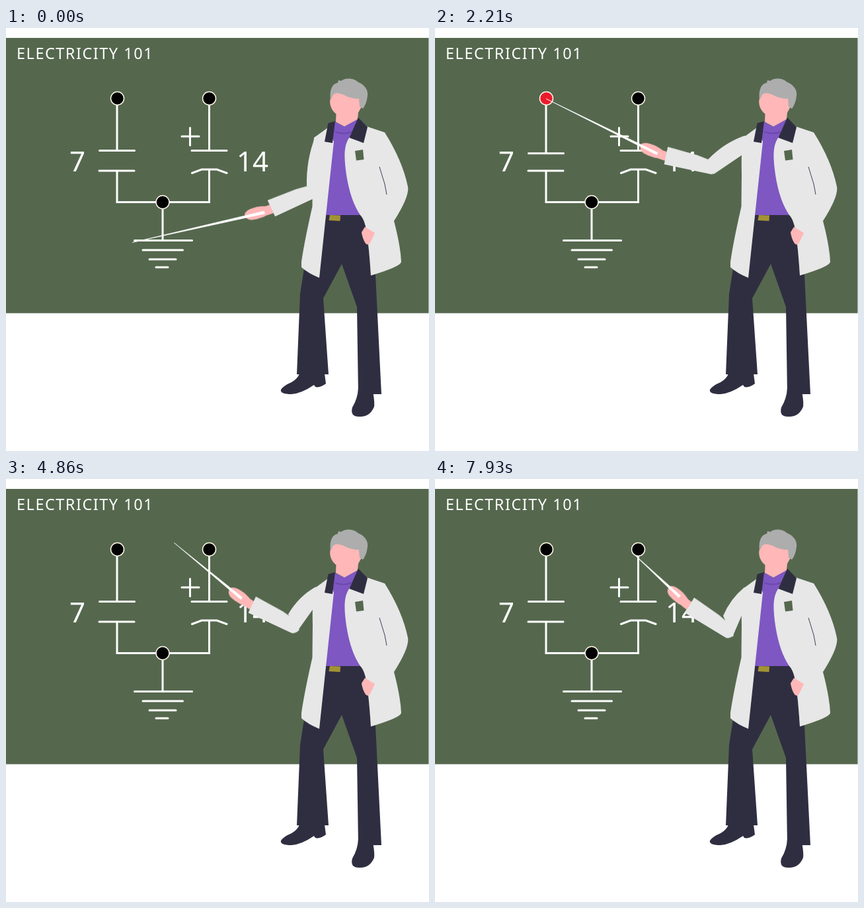
An HTML page that plays this animation: 640 by 640 pixels, repeating every 8 s.

```html
<!DOCTYPE html>
<html lang="en">
<head>
<meta charset="utf-8">
<title>Electricity 101</title>
<style>
  html, body { margin: 0; width: 100%; height: 100%; overflow: hidden; background: #fff; }
  svg { display: block; width: 100%; height: 100%; }

  .board { fill: #55684e; }
  .wire { fill: none; stroke: #fff; stroke-width: 3; stroke-linecap: round; }
  .node { fill: #000; stroke: #fff8ea; stroke-width: 1.5; }
  .chalk { fill: #fff; font-family: "Noto Sans", "Open Sans", sans-serif; }
  .dark { fill: #2f2e41; }
  .coat { fill: #e7e7e7; }
  .skin { fill: #ffb7b7; }
  .stick { fill: #fff; stroke: #fff; stroke-width: .6; stroke-linejoin: round; }
  .spark { fill: none; stroke: #fff; stroke-width: 1.5; stroke-linejoin: round; }

  .anim { animation: 8s linear infinite; }
  .plate-a { animation-name: plate-a; }
  .plate-b { animation-name: plate-b; }
  .node-a { animation-name: node-a; }
  .node-b { animation-name: node-b; }
  .spark-a { animation-name: spark-a; }
  .spark-b { animation-name: spark-b; }
  .forearm { animation-name: forearm; }
  .upper { animation-name: upper; }
  .stick { animation-name: stick; }
  .node-a, .node-b, .spark-a, .spark-b { animation-timing-function: step-end; }

  @keyframes plate-a {
    0%, 22.875%, 55.6%, 100% { transform: translateY(0); }
    32.1%, 46.5% { transform: translateY(8px); }
  }
  @keyframes plate-b {
    0%, 67.875%, 98.5%, 100% { transform: translateY(0); }
    75.8%, 92.9% { transform: translateY(8px); }
  }
  @keyframes node-a {
    0%, 47.3% { fill: #000; }
    22.8% { fill: #ea1b2c; }
  }
  @keyframes node-b {
    0%, 93.7% { fill: #000; }
    68.7% { fill: #ea1b1c; }
  }
  @keyframes spark-a {
    0%, 37.5%, 45.5% { opacity: 0; }
    33%, 42% { opacity: 1; }
  }
  @keyframes spark-b {
    0%, 82.1%, 91.1% { opacity: 0; }
    77.6%, 86.6% { opacity: 1; }
  }

  /* The forearm turns about the elbow; the upper arm bends to follow it. */
  @keyframes forearm {
    0%, .4% { transform: translate(476px, 253px) rotate(-25deg); }
    15.125% { transform: translate(438px, 233px) rotate(0deg); }
    22.875%, 46.5% { transform: translate(421px, 222px) rotate(12deg); }
    53.625% { transform: translate(426px, 227px) rotate(17deg); }
    67.875%, 92.9% { transform: translate(445px, 242px) rotate(33deg); }
    99.125%, 100% { transform: translate(443px, 242px) rotate(31.3deg); }
  }
  @keyframes upper {
    0%, .4% { d: path("M455 239Q454 200 468 164L482 165L478 179L476 253Z"); }
    15.125% { d: path("M426 212Q441 183 468 164L482 165L478 179L440 231Z"); }
    22.875%, 46.5% { d: path("M413 199Q437 174 468 163L482 165L478 183L422 221Z"); }
    53.625% { d: path("M417 203Q438 176 468 163L482 165L478 182L428 226Z"); }
    67.875%, 92.9% { d: path("M437 206Q447 180 468 164L482 165L478 174L451 238Z"); }
    99.125%, 100% { d: path("M436 207Q447 181 468 164L482 165L478 174L450 239Z"); }
  }
  @keyframes stick {
    0%, .4% { d: path("M390.5 277L391.5 281L191 324.5Z"); }
    10.75% { d: path("M361.5 235L360.5 239L164 219Z"); }
    15.125% { d: path("M350.5 217.5L349.5 221.5L159 174Z"); }
    22.875%, 46.5% { d: path("M337 188.5L335.5 192L168 107Z"); }
    53.625% { d: path("M343 185L341 188.5L203 103Z"); }
    57.125% { d: path("M350 182L348 185.5L230 97.5Z"); }
    62.5% { d: path("M361 177.5L359 181L266 96Z"); }
    67.875% { d: path("M374.5 172.5L371.5 175.5L302 102Z"); }
    68.75%, 92.9% { d: path("M375.5 172.5L372.5 175.5L306 105Z"); }
    99.125%, 100% { d: path("M371.5 176.5L368.5 179.5L298 111Z"); }
  }
</style>
</head>
<body>
<svg viewBox="0 0 640 640">
  <defs>
    <path id="bolts" d="M6 0L1 6H7L2 12M26 0L21 6H27L22 12M46 0L41 6H47L42 12"/>
  </defs>

  <rect class="board" y="15" width="639.5" height="416.5"/>
  <text class="chalk" x="16" y="47" font-size="23.5" letter-spacing="1.5">ELECTRICITY 101</text>
  <text class="chalk" x="96" y="217" font-size="42">7</text>
  <text class="chalk" x="349" y="217" font-size="42">14</text>

  <!-- circuit -->
  <g class="wire">
    <path d="M141 216H194M168 216V263.5H307.5V214M281.5 219.5L296 214H319L334 219.5"/>
    <path d="M266 164H292M278.5 151V177.5"/>
    <path d="M237 264V321.5M194.5 321.5H281.5M207 336H267.500M217 350H257M227 362H245"/>
    <path class="anim plate-a" d="M168 106V185.500M141.500 185.500H194.500"/>
    <path class="anim plate-b" d="M307.500 106V185.500M281 185.500H334"/>
  </g>
  <use class="spark anim spark-a" href="#bolts" x="144" y="201"/>
  <use class="spark anim spark-b" href="#bolts" x="284" y="198"/>
  <circle class="node anim node-a" cx="168.500" cy="106.500" r="10"/>
  <circle class="node anim node-b" cx="307.500" cy="106.500" r="10"/>
  <circle class="node" cx="237" cy="263.500" r="10"/>

  <!-- legs -->
  <g class="dark">
    <path d="M484 282H537L546 300L552 372L559 373L568 554H533L531 422L508 357L480 409L488 524H440L445 402L451 364L474 376Z"/>
    <path d="M444 523H482L484 538Q475 545 468 543L466 540Q447 553 432 554Q414 554 416 547Q420 541 432 536Q441 531 444 523Z"/>
    <path d="M533 545L555 550Q558 565 557 573Q551 588 536 588Q520 589 524 574Q532 561 533 545Z"/>
  </g>
  <path fill="#a39334" d="M490 283L506 283.500L505.500 292L488.500 291Z"/>

  <!-- torso -->
  <path fill="#7e57c2" d="M496 141L512 149L530 137L535 150L522 168L520 220L537 283H484L488 225Z"/>
  <path fill="none" stroke="#6c49ad" stroke-width="2" d="M498 157Q511 162 523 157"/>
  <path class="coat" d="M488 150L466 166Q463 190 464 220L463.500 270Q451 325 447 354V362Q457 371 474 378L484 284L496 172Z"/>
  <path class="coat" d="M546 149L573 158Q600 201 608 240Q611 254 587 292Q597 330 598 354Q597 361 552 374.500Q549 325 544 300Q541 288 536 283Q521 261 515 222C511 194 511 177 520 165Z"/>
  <path fill="none" stroke="#3f3d56" d="M565 210L573 236L576 252"/>
  <path class="board" d="M528 186L540 184L541.500 199L530 200.500Z"/>
  <path class="skin" d="M543 301L558 310L551 325Q548 330 544 326Q539 318 538 309Z"/>

  <!-- head -->
  <path class="skin" d="M498 96C487 104 488 121 499.500 130L499 142L512 149L532 138L533 128L538 119L536 104L518 98Z"/>
  <path fill="#adadad" d="M491 109C489 93 494 84 502 83L503 79L507 80C515 74 527 76 533 82C543 86 548 94 547 102Q546 114 540 122L535 119L534 107Q521 107 511 101Q499 96 495 101Z"/>

  <!-- pointing arm -->
  <path class="coat anim upper" d="M455 239Q454 200 468 164L482 165L478 179L476 253Z"/>
  <g class="anim forearm">
    <path class="skin" d="M-72 -19L-82 -20Q-96 -27 -108 -26Q-117 -25 -117 -20Q-117 -13 -110 -10Q-99 -6 -88 -7L-72 -5Z"/>
    <path class="coat" d="M-76 -27L-30 -24L-12 -21L5 -9Q1 0 -4 0H-76Z"/>
  </g>
  <path class="anim stick" d="M390.500 277L391.500 281L191 324.500Z"/>

  <!-- collar -->
  <path class="dark" d="M487.500 144L498 141L494 174L482 172Z"/>
  <path class="dark" d="M533 135.500L547 150L541 174L519.500 166Z"/>
</svg>
</body>
</html>
```
